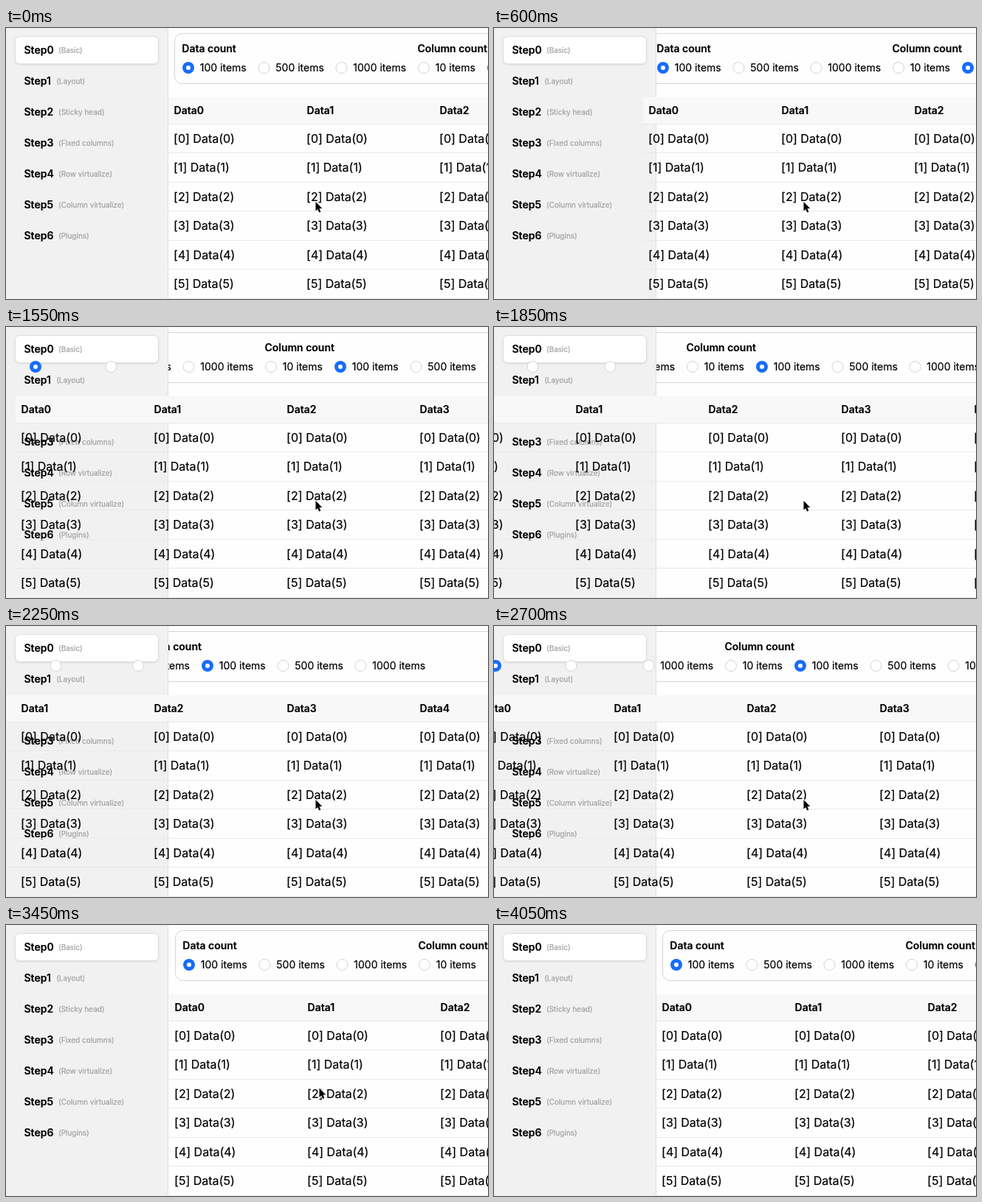
An HTML page for the animation above (4250 ms loop, 653 px wide and 368 px high).

```html
<!DOCTYPE html>
<html lang="en">
<head>
<meta charset="utf-8">
<title>Table scroll</title>
<style>
  html, body { margin: 0; width: 100%; height: 100%; overflow: hidden; background: #fefefe; }
  svg { display: block; width: 653px; height: 368px; }
  text {
    font: 14px Inter, Roboto, sans-serif; font-feature-settings: "calt" 0; white-space: pre;
    color: #000; fill: currentColor; stroke: currentColor; stroke-width: .2px;
  }
  .bold { font-weight: 600; }
  .cell { font-size: 16px; }
  .hint { font-size: 10px; color: #a0a0a0; }
  .card { fill: #fff; stroke: #dedede; filter: drop-shadow(0 1px 1px rgba(0, 0, 0, .1)); }
</style>
</head>
<body>
<svg viewBox="0 0 653 368">
  <g id="panel"></g>
  <g id="sidebar"></g>
  <g id="table"></g>
  <path id="cursor" d="M0 0V12.4L2.8 9.9 4.7 14.4 6.9 13.5 5 9H8.8Z"
    fill="#000" stroke="#fff" stroke-width="1.8" stroke-linejoin="round" paint-order="stroke"/>
</svg>
<script>
const LOOP = 4250, STEP = 50, COLUMNS = 7, ROWS = 6;
const [panel, sidebar, table, cursor] =
  ['panel', 'sidebar', 'table', 'cursor'].map(id => document.getElementById(id));

function add(parent, tag, attrs, content = '') {
  const el = document.createElementNS('http://www.w3.org/2000/svg', tag);
  for (const key in attrs) el.setAttribute(key, attrs[key]);
  el.textContent = content;
  parent.append(el);
}
const text = (parent, x, y, content, cls = '') => add(parent, 'text', { x, y, class: cls }, content);
const rect = (parent, x, y, width, height, fill, more) =>
  add(parent, 'rect', { x, y, width, height, fill, ...more });

// Options panel: the labels pass under the sidebar, the radios over it
rect(panel, 228.5, 7.5, 1200, 68, '#fefefe', { rx: 10, stroke: '#d6d6d6' });
text(panel, 238.3, 33, 'Data count', 'bold');
text(panel, 557.4, 33, 'Column count', 'bold');

function radio(x, count, checked) {
  text(panel, x + 15.8, 59, count + ' items');
  if (checked) {
    add(table, 'circle', { cx: x, cy: 54, r: 8, fill: '#186cfb' });
    add(table, 'circle', { cx: x, cy: 54, r: 3, fill: '#fff' });
  } else {
    add(table, 'circle', { cx: x, cy: 54, r: 7.5, fill: '#fff', stroke: '#d4d4d4' });
  }
}
radio(247, 100, true);
radio(349.5, 500);
radio(454.5, 1000);
radio(566, 10);
radio(660, 100, true);
radio(762.5, 500);
radio(867.5, 1000);

// Sidebar
rect(sidebar, 0, 0, 219, 368, '#f1f1f1');
rect(sidebar, 219, 0, 1, 368, '#dfdfdf');
rect(sidebar, 12.5, 11.5, 194, 37, '#fff', { rx: 6, class: 'card' });
['Basic', 'Layout', 'Sticky head', 'Fixed columns', 'Row virtualize', 'Column virtualize', 'Plugins']
  .forEach((name, i) => {
    text(sidebar, 24.5, 35 + 42 * i, 'Step' + i, 'bold');
    text(sidebar, i === 1 ? 68.2 : 71, 33.5 + 42 * i, `(${name})`, 'hint');
  });

// Table
rect(table, 220, 94, 1400, 36, '#f8f8f8');
for (let r = 0; r <= ROWS; r++) rect(table, 220, Math.floor(130 + 39.5 * r), 1400, 1, '#e9e9e9');
for (let c = 0; c < COLUMNS; c++) {
  const x = 227.6 + 180 * c;
  text(table, x, 117, 'Data' + c, 'bold');
  for (let r = 0; r < ROWS; r++) {
    text(table, x - .5, Math.floor(156 + 39.5 * r), `[${r}] Data(${r})`, 'cell');
  }
}

// Scroll offset over time, as [ms, px], joined by a monotone curve
const keys = [[0, 0], [300, 4], [600, 18], [1050, 78], [1550, 207], [2250, 387], [2350, 392],
  [2700, 245], [2950, 48], [3100, -8], [3200, -8], [3400, -1.5], [3600, 0], [LOOP, 0]];
const slope = i => (keys[i + 1][1] - keys[i][1]) / (keys[i + 1][0] - keys[i][0]);
function tangent(i) {
  if (i === 0 || i === keys.length - 1) return 0;
  const a = slope(i - 1), b = slope(i);
  return a * b > 0 ? 2 * a * b / (a + b) : 0;
}
function scrollAt(t) {
  const i = keys.findIndex(k => k[0] > t) - 1;
  const [t0, p0] = keys[i], [t1, p1] = keys[i + 1];
  const d = t1 - t0, u = (t - t0) / d, v = 1 - u;
  return v * v * (1 + 2 * u) * p0 + u * u * (3 - 2 * u) * p1
    + d * u * v * (v * tangent(i) - u * tangent(i + 1));
}

function draw(now) {
  const t = Math.floor(now % LOOP / STEP) * STEP;
  const shift = `translate(${-Math.round(scrollAt(t))} 0)`;
  panel.setAttribute('transform', shift);
  table.setAttribute('transform', shift);
  // The pointer leaves through the top once the scroll has settled
  const u = Math.min(1, Math.max(0, (t - 3400) / 350)), leave = u * u * (3 - 2 * u);
  cursor.setAttribute('transform', `translate(${419.5 + 90 * leave} ${236 - 260 * leave})`);
}

const start = performance.now();
function tick() {
  draw(Math.max(0, performance.now() - start));
  requestAnimationFrame(tick);
}
tick();
</script>
</body>
</html>
```
